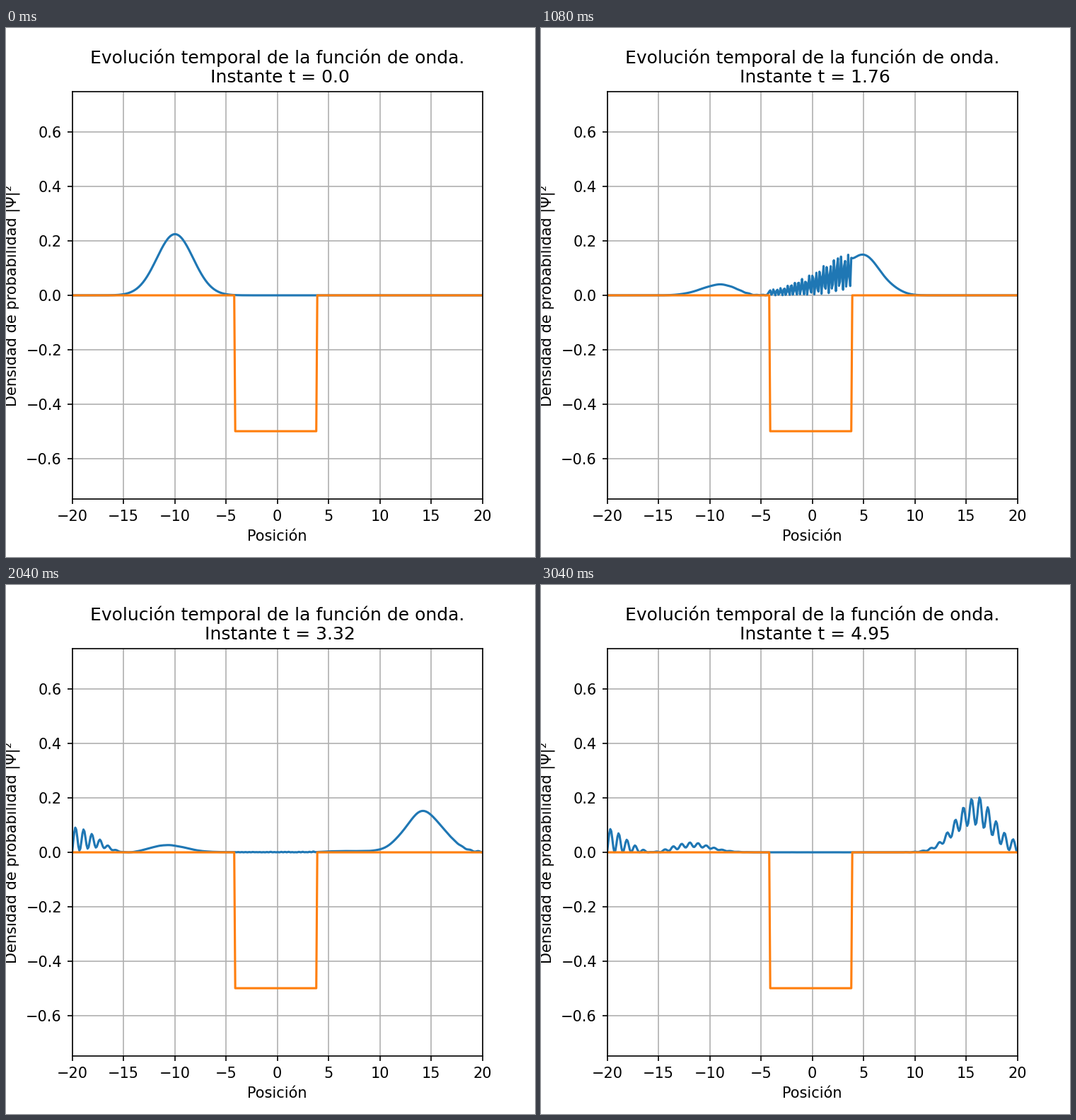
Animation of 748x748 px, one loop 3.08 s. Source, as a matplotlib script:

```python
import numpy as np
import matplotlib.pyplot as plt
from matplotlib.animation import FuncAnimation

FRAMES, INTERVAL = 77, 40

# Lattice units
N, CYCLES, DEPTH = 401, 25, 4
DX = 0.1
K0 = 2 * np.pi * CYCLES / N
S = 1 / K0**2
DT = S * DX**2

j = np.arange(N)
x = -20 + DX * j
well = (x > -4.15) & (x < 3.85)


def propagator():
    """Crank-Nicolson step for H = -d2/dj2 + V, hard wall at the last point."""
    n = N - 1
    V = -DEPTH * K0**2 * well[:n]
    H = np.diag(2 + V) - np.eye(n, k=1) - np.eye(n, k=-1)
    one = np.eye(n)
    return 2 * np.linalg.inv(one + 0.5j * S * H) - one


def densities():
    i = j[:-1]
    psi = np.exp(1j * K0 * i - 8 * (4 * i - N) ** 2 / N**2)
    psi /= np.sqrt(np.sum(np.abs(psi) ** 2) * DX)
    step = propagator()
    out = []
    for _ in range(FRAMES):
        psi[0] = 0  # pinned end: the left wall absorbs a little
        out.append(np.append(np.abs(psi) ** 2, 0))
        psi = step @ psi
    return out


rho = densities()

fig, ax = plt.subplots(figsize=(4.98667, 4.98667), dpi=150)
fig.subplots_adjust(left=0.1251, right=0.9006, bottom=0.1094, top=0.8799)
ax.set_xlim(-20, 20)
ax.set_ylim(-0.75, 0.75)
ax.set_xticks(range(-20, 21, 5))
ax.set_xlabel("Posición")
ax.set_ylabel("Densidad de probabilidad |Ψ|²")
ax.grid(True)
wave, = ax.plot(x, rho[0])
ax.plot(x, np.where(well, -0.5, 0))


def update(k):
    wave.set_ydata(rho[k])
    t = round(float(k * DT), 2)
    ax.set_title(f"Evolución temporal de la función de onda.\n Instante t = {t}")
    return wave, ax.title


anim = FuncAnimation(fig, update, frames=FRAMES, interval=INTERVAL, repeat=True)
plt.show()
```
